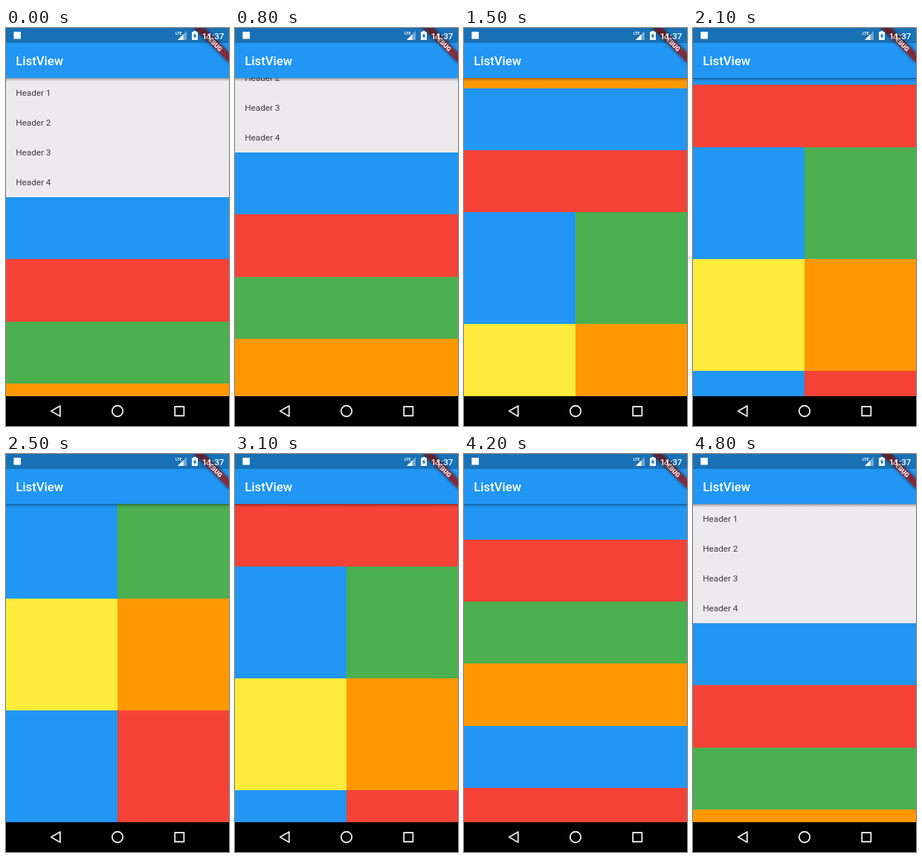
Write an HTML page that moves like this. It is 300 px wide and 534 px high and loops after 5 s.

```html
<!DOCTYPE html>
<html lang="en">
<head>
<meta charset="utf-8">
<title>ListView</title>
<style>
  html, body { margin: 0; width: 100%; height: 100%; overflow: hidden; background: #000; }
  svg { display: block; width: 100%; height: 100%; }
  text { font-family: Roboto, sans-serif; fill: #fff; }
  .header { font-size: 11.67px; fill: #3b3a3c; }
</style>
</head>
<body>
<svg viewBox="0 0 300 534">
  <defs>
    <clipPath id="screen"><rect width="300" height="494"/></clipPath>
    <linearGradient id="shade" x1="0" y1="0" x2="0" y2="1">
      <stop offset="0" stop-opacity=".4"/>
      <stop offset=".45" stop-opacity=".15"/>
      <stop offset="1" stop-opacity="0"/>
    </linearGradient>
    <filter id="blur" x="-20%" y="-80%" width="140%" height="260%">
      <feGaussianBlur stdDeviation="1.9"/>
    </filter>
  </defs>

  <g clip-path="url(#screen)">
    <rect y="67" width="300" height="427" fill="#eceaed"/>
    <g id="list"></g>
    <path id="glow" d="M0 67H300Q150 119 0 67Z" fill="#2196f3"/>
    <rect y="67" width="300" height="5" fill="url(#shade)"/>
    <rect width="300" height="67" fill="#2196f3"/>
    <text x="13.3" y="50" font-size="16.67" font-weight="500">ListView</text>

    <g transform="translate(300 0) rotate(45)">
      <rect x="-33.3" y="23.3" width="66.7" height="10" fill-opacity=".5" filter="url(#blur)"/>
      <rect x="-33.3" y="23.3" width="66.7" height="10" fill="#b71c1c" fill-opacity=".63"/>
      <text y="31.4" font-size="8.5" font-weight="900" text-anchor="middle">DEBUG</text>
    </g>
    <rect width="300" height="20" fill-opacity=".25"/>
  </g>

  <g fill="#fff">
    <rect x="10.3" y="5" width="9.6" height="9.6"/>
    <path d="M231 16L243 4V16Z" fill-opacity=".4"/>
    <path d="M231 16L238.5 8.5V16Z"/>
    <text x="228" y="9" font-size="5.2" font-weight="700">LTE</text>
    <path d="M250 5.3H252.4V4H255.6V5.3H258V16H250Z"/>
    <path d="M254.7 6.8L251.6 11.3H253.5V14.6L256.5 10H254.7Z" fill="#1970b6"/>
    <text x="263.8" y="14.7" font-size="11.67" font-weight="500">11:37</text>
  </g>

  <rect y="494" width="300" height="40"/>
  <g fill="none" stroke="#e8e8e8" stroke-width="1.9" stroke-linejoin="round">
    <path d="M60.7 514L72.8 507V521Z"/>
    <circle cx="150" cy="514" r="7.2"/>
    <rect x="227.2" y="508" width="12.2" height="12.2"/>
  </g>
</svg>
<script>
  const BLUE = '#2196f3', RED = '#f44336', GREEN = '#4caf50',
        ORANGE = '#ff9800', YELLOW = '#ffeb3b';
  const TOP = 67, ROW = 40, BAND = 250 / 3, CELL = 150;
  const LOOP = 5000, TICK = 100, MAX = 683.3;

  const list = document.getElementById('list');
  const glow = document.getElementById('glow');

  function add(tag, attrs, text = '') {
    const el = document.createElementNS('http://www.w3.org/2000/svg', tag);
    for (const key in attrs) el.setAttribute(key, attrs[key]);
    el.textContent = text;
    list.appendChild(el);
  }

  function box(x, y, width, height, fill) {
    add('rect', { x, y, width, height, fill, 'shape-rendering': 'crispEdges' });
  }

  for (let i = 0; i < 4; i++) {
    add('text', { x: 13.3, y: TOP + ROW * i + 24, class: 'header' }, `Header ${i + 1}`);
  }
  const bandTop = TOP + 4 * ROW;
  const bands = [BLUE, RED, GREEN, ORANGE, BLUE, RED];
  bands.forEach((fill, i) => box(0, bandTop + BAND * i, 300, BAND, fill));
  const gridTop = bandTop + BAND * bands.length;
  [BLUE, GREEN, YELLOW, ORANGE, BLUE, RED].forEach((fill, i) =>
    box(i % 2 * CELL, gridTop + CELL * Math.floor(i / 2), CELL, CELL, fill));

  const easeOut = power => u => 1 - (1 - u) ** power;
  const drag = u => { const v = u ** 1.4; return v * v * (3 - 2 * v); };

  // Each swipe: start time, ticks it lasts, end offset, easing
  const swipes = [
    [600, 6, 186, drag],
    [1200, 6, 510, easeOut(2.16)],
    [2100, 5, MAX, easeOut(1.8)],
    [3100, 7, 405.8, easeOut(3.16)],
    [4100, 6, 0, easeOut(1.8)]
  ];

  function offsetAt(t) {
    let pos = 0;
    for (const [start, ticks, end, ease] of swipes) {
      if (t < start) break;
      const u = Math.min(1, ((t - start) / TICK + 1) / ticks);
      pos += (end - pos) * ease(u);
    }
    return pos;
  }

  function draw(now) {
    const t = Math.floor(now % LOOP / TICK) * TICK;
    list.setAttribute('transform', `translate(0 ${-offsetAt(t)})`);
    glow.setAttribute('opacity', t >= 4600 ? Math.max(0, (4800 - t) / 800) : 0);
  }

  function frame() {
    draw(performance.now());
    requestAnimationFrame(frame);
  }
  frame();
</script>
</body>
</html>
```
